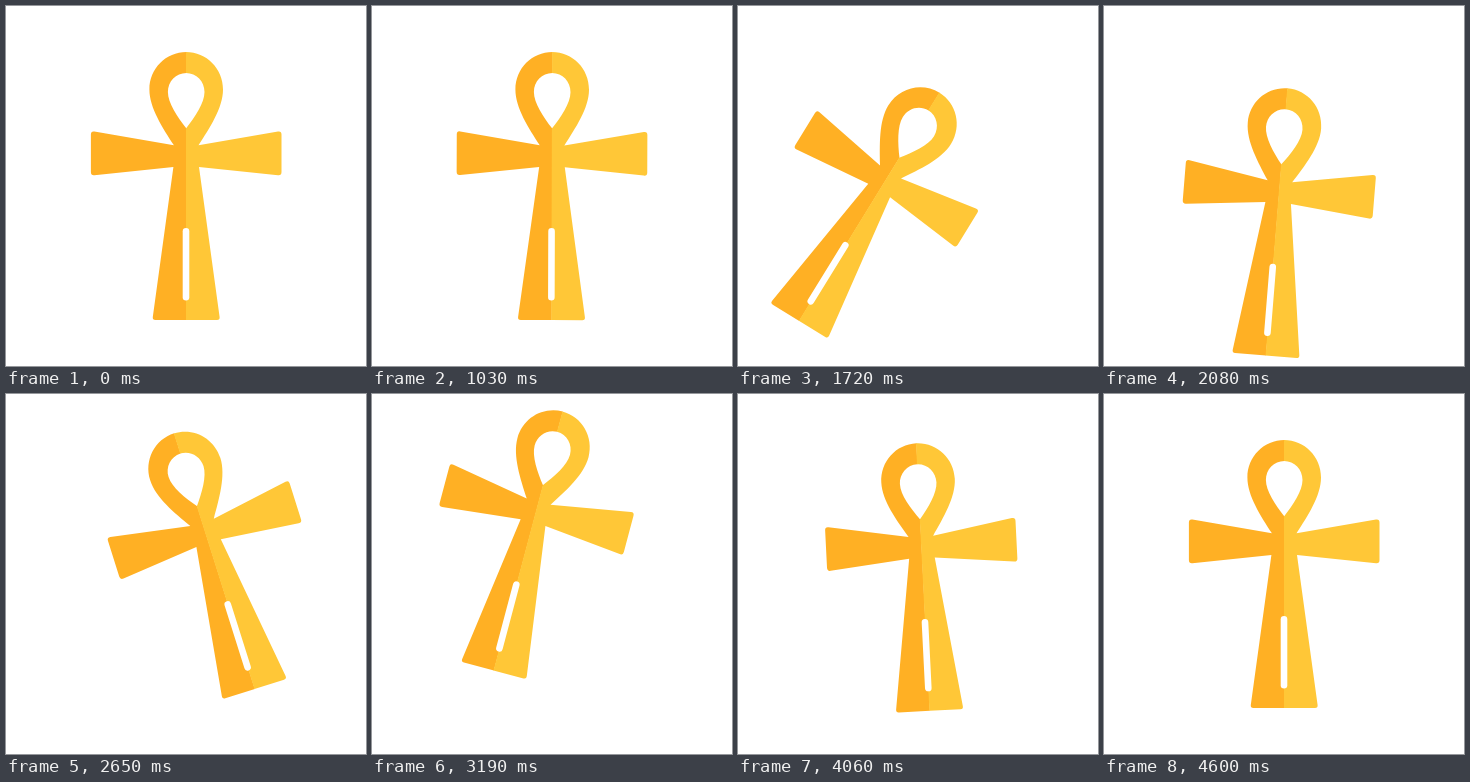
Write an HTML page without scripts that moves like this. It is 360 by 360 pixels and loops after 4.63 s.

```html
<!DOCTYPE html>
<html lang="en">
<head>
<meta charset="utf-8">
<title>Swinging ankh</title>
<style>
  html, body { margin: 0; width: 100%; height: 100%; overflow: hidden; background: #fff; }
  svg { display: block; width: 100%; height: 100%; }

  .ankh {
    --sine: cubic-bezier(.37, 0, .63, 1);
    transform-origin: 180px 86.5px;
    animation: swing 4630ms var(--sine) infinite, bob 4630ms var(--sine) infinite;
  }
  .dark { fill: #ffb024; }
  .light { fill: #ffc737; }
  .slot { fill: #fff; }

  @keyframes swing {
    0%, 21.6% { rotate: 0deg; }
    35.64% { rotate: 32.5deg; }
    53.67% { rotate: -20.5deg; }
    74.41% { rotate: 21.7deg; }
    90.93% { rotate: -5.3deg; }
    99.35%, 100% { rotate: 0deg; }
  }
  @keyframes bob {
    0%, 21.6% { translate: 0 0; }
    41.04% { translate: 0 38px; animation-timing-function: cubic-bezier(.55, 0, .5, 1); }
    67.82% { translate: 0 -30.5px; }
    82.29% { translate: 0 9px; }
    91.36%, 100% { translate: 0 0; }
  }
</style>
</head>
<body>
<svg viewBox="0 0 360 360">
  <defs>
    <path id="half" d="M180 46C200.5 46 217 62.5 217 83.5C217 102 203.5 122 192.5 139.3
      L272 125.6Q275.5 125 275.5 128.5V166Q275.5 169.6 272 169.2L193 161
      L213.6 311Q214 314 211 314H180V122.5C189 111 198.5 97 198.5 86C198.5 75.5 190.5 67 180 67Z"/>
  </defs>
  <g class="ankh">
    <!-- the mirrored half overlaps slightly to hide the seam -->
    <use href="#half" class="dark" transform="translate(360.4) scale(-1 1)"/>
    <use href="#half" class="light"/>
    <rect class="slot" x="176.7" y="222" width="6.6" height="72.5" rx="3.3"/>
  </g>
</svg>
</body>
</html>
```
